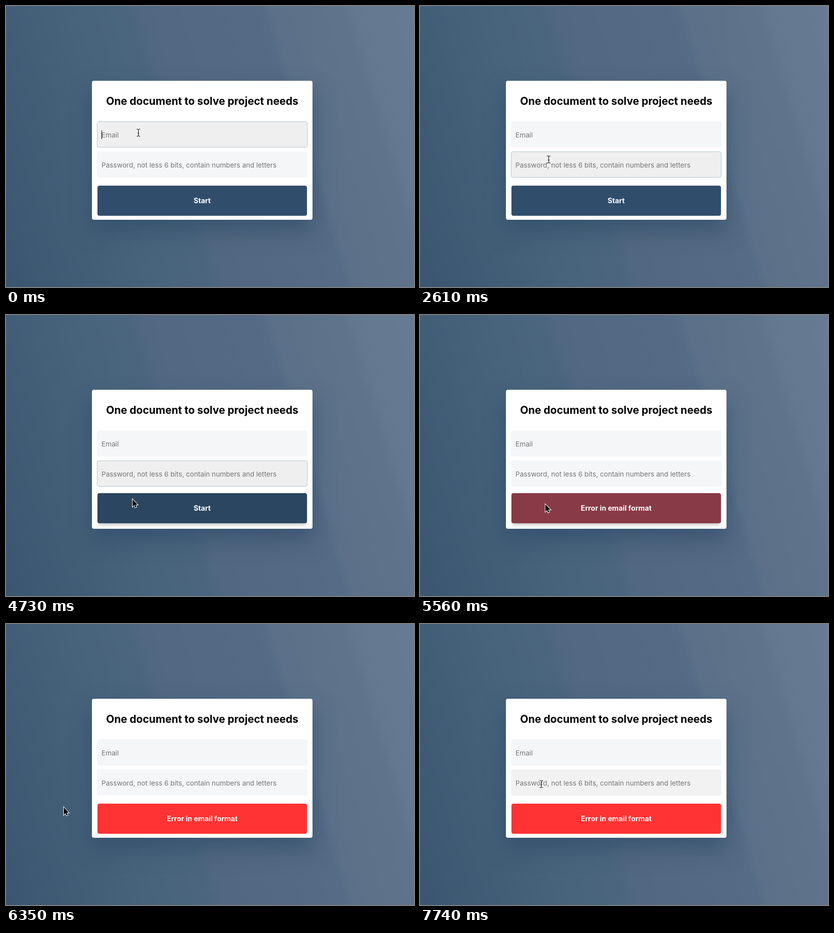
An HTML page for the animation above (8 s loop, 812 by 560 pixels).

```html
<!DOCTYPE html>
<html lang="en">
<head>
<meta charset="utf-8">
<title>Sign-up form</title>
<style>
  html, body { margin: 0; width: 100%; height: 100%; overflow: hidden; }
  body {
    position: relative;
    font-family: Inter, sans-serif;
    font-optical-sizing: none;
    background: linear-gradient(73.3deg, #3b5670, #48637c 32%, #4b657e 41%, #526882 45%,
      #566b85 69%, #5c7189 71%, #5f738a 85%, #64788f 88%, #667a91);
  }
  div { position: absolute; box-sizing: border-box; border-radius: 4px; white-space: nowrap; }
  #card {
    left: 171px; top: 149px; width: 439px; height: 277px; background: #fff;
    box-shadow: 0 22px 42px rgba(45, 76, 103, .65);
  }
  #title { left: 0; top: 21px; width: 439px; text-align: center; font-weight: 700; font-size: 21.05px; line-height: 40px; }
  .field {
    left: 10px; width: 419px; height: 52px; padding-left: 8px;
    border: 1px solid; color: #757575; font-size: 13.65px; line-height: 52px;
  }
  .caret { left: 8px; top: 17px; width: 1px; height: 17px; background: #000; border-radius: 0; }
  #email { top: 81px; }
  #password { top: 141px; }
  #button {
    left: 11px; top: 209px; width: 417px; height: 60px;
    color: #fff; text-align: center; font-weight: 700; font-size: 14.2px; line-height: 60px;
  }
  svg { position: absolute; left: 0; top: 0; width: 812px; height: 560px; }
  #arrow { stroke: #fff; stroke-width: 2; paint-order: stroke; }
  #beam { fill: none; stroke: #000; }
</style>
</head>
<body>
<div id="card">
  <div id="title">One document to solve project needs</div>
  <div id="email" class="field">Email<div class="caret"></div></div>
  <div id="password" class="field">Password, not less 6 bits, contain numbers and letters<div class="caret"></div></div>
  <div id="button">Start</div>
</div>
<svg viewBox="0 0 812 560">
  <g id="pointer">
    <path id="arrow" d="M0 0V14.6L3.3 11.5 5.4 16.3 7.8 15.3 5.7 10.6H10Z"/>
    <path id="beam" d="M-3.5-7H-2Q0-7 0-5.5V5.5Q0 7-2 7H-3.5M3.5-7H2Q0-7 0-5.5M0 5.5Q0 7 2 7H3.5M-1.5 1H1.5"/>
  </g>
</svg>
<script>
const LOOP = 8000;
const [email, password, button, pointer, arrow, beam] =
  ['email', 'password', 'button', 'pointer', 'arrow', 'beam'].map(id => document.getElementById(id));

// Pointer moves; it rests in between
const origin = [263.5, 252.5];
const moves = [
  { from: 820, to: 1610, x: 255.5, y: 315.5 },
  { from: 2450, to: 3080, x: 259.5, y: 256.5 },
  { from: 3270, to: 3610, x: 254.5, y: 341.5 },
  { from: 3610, to: 4080, x: 254, y: 359 },
  { from: 4420, to: 5080, x: 249.5, y: 377.3 },
  { from: 5910, to: 6350, x: 115, y: 365.5 },
  { from: 6480, to: 6770, x: 200, y: 372 },
  { from: 6950, to: 7200, x: 157, y: 352 },
  { from: 7200, to: 7740, x: 241.5, y: 319 }
];

const mix = (a, b, k) => a + (b - a) * k;
const rgb = (a, b, k, gain = 1) => `rgb(${a.map((v, i) => Math.round(mix(v, b[i], k) * gain))})`;
const show = (el, on) => { el.style.visibility = on ? 'visible' : 'hidden'; };
const ramp = (t, from, to) => {
  const k = Math.min(1, Math.max(0, (t - from) / (to - from)));
  return k * k * (3 - 2 * k);
};
// Fades in at one time and out at another
const pulse = (t, on, off, fade) => ramp(t, on, on + fade) - ramp(t, off, off + fade);
const blink = (t, start) => (t - start + LOOP) % 1000 < 500;

function drawField(field, focus, hover, caretOn) {
  const grey = mix(242, 239, focus);
  field.style.background = rgb([245, 246, 248], [grey, grey, grey], Math.max(focus, hover));
  field.style.borderColor = `rgba(184, 194, 203, ${focus})`;
  show(field.lastChild, caretOn);
}

function drawButton(t) {
  const hover = pulse(t, 4010, 6080, 250) + pulse(t, 6530, 7040, 250);
  button.textContent = t < 5440 ? 'Start' : 'Error in email format';
  button.style.background = rgb([48, 78, 107], [255, 51, 51], ramp(t, 5400, 5720), 1 - .1 * hover);
  button.style.transform = `translateY(${-3 * hover}px)`;
  button.style.boxShadow = `0 5px 6px -2px rgba(0, 0, 0, ${.25 * hover})`;
}

function drawPointer(t) {
  let [x, y] = origin;
  for (const move of moves) {
    const k = ramp(t, move.from, move.to);
    x = mix(x, move.x, k);
    y = mix(y, move.y, k);
  }
  const inField = x > 181 && y < 342 && !(y > 282 && y < 290);
  pointer.setAttribute('transform', `translate(${x} ${y})`);
  show(beam, inField);
  show(arrow, !inField);
}

function draw() {
  const t = performance.now() % LOOP;
  const passwordFocus = pulse(t, 2110, 5400, 150);
  drawField(email, 1 - ramp(t, 2110, 2260), pulse(t, 2750, 3370, 150), t < 2140 && blink(t, 910));
  drawField(password, passwordFocus, pulse(t, 1300, 2750, 150) + pulse(t, 7520, LOOP, 150),
    t > 2140 && t < 5430 && blink(t, 2080));
  drawButton(t);
  drawPointer(t);
  requestAnimationFrame(draw);
}
draw();
</script>
</body>
</html>
```
